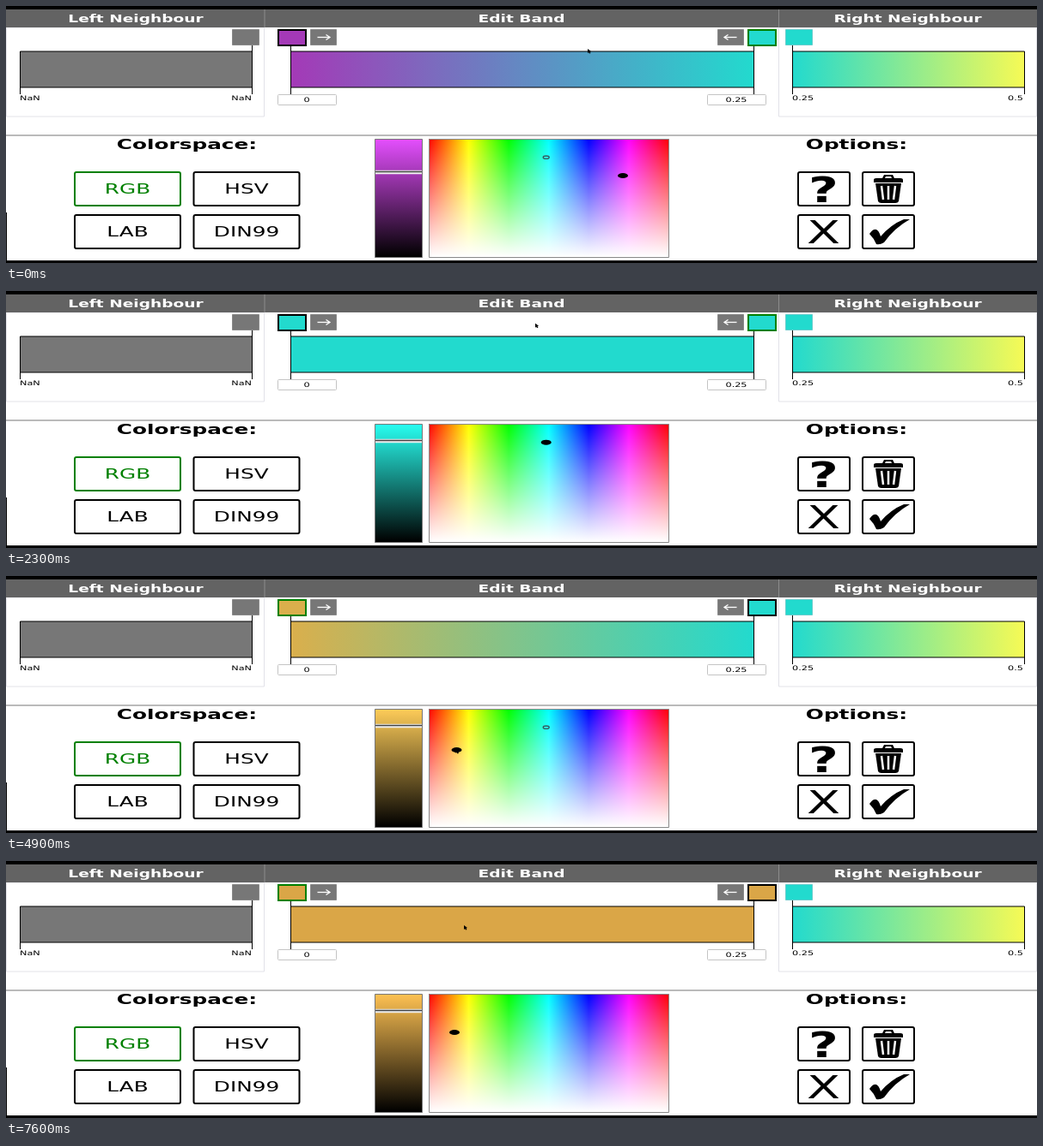
An HTML page with a canvas for the animation above (7700 ms loop, 1200x300 px).

```html
<!DOCTYPE html>
<html>
<head>
<meta charset="utf-8">
<style>
html, body { margin: 0; width: 100%; height: 100%; overflow: hidden; background: #fff; }
canvas { display: block; }
</style>
</head>
<body>
<canvas id="stage" width="1200" height="300"></canvas>
<script>
const ctx = document.getElementById('stage').getContext('2d');
const LOOP = 7700, STEP = 100, ASPECT = 1.5;
const FIELD = { x: 492, y: 155, w: 279.5, h: 138 };
const GREY = '#777', GREEN = '#008000';
const COPY_LEFT = 1600, SWITCH = 3300, PICK = 4800, PICK_END = 5000, COPY_RIGHT = 6200;

// time, x, y of the pointer
const pointerPath = [
  [0, 678, 51], [1000, 836, 36], [1700, 836, 36], [3000, 341, 42], [3500, 341, 42],
  [4200, 474, 141], [4800, 527, 206], [5000, 522, 200], [5200, 522, 200],
  [5700, 393, 55], [5900, 378, 37], [6900, 378, 37], [7200, 425, 44], [7600, 534, 76]
];

function pointerAt(t) {
  let i = 1;
  while (i < pointerPath.length - 1 && pointerPath[i][0] < t) i++;
  const [t0, x0, y0] = pointerPath[i - 1], [t1, x1, y1] = pointerPath[i];
  const k = Math.min(1, Math.max(0, (t - t0) / (t1 - t0)));
  const e = k * k * (3 - 2 * k);
  return { x: x0 + (x1 - x0) * e, y: y0 + (y1 - y0) * e };
}

function hsv(h, s, v) {
  const f = n => {
    const k = (n + h / 60) % 6;
    return Math.round(255 * v * (1 - s * Math.max(0, Math.min(k, 4 - k, 1))));
  };
  return `rgb(${f(5)},${f(3)},${f(1)})`;
}

const PURPLE = { x: 718, y: 198, v: 0.717 };
const TEAL = { x: 628.7, y: 176.7, v: 0.855 };
const colorOf = (p, v = p.v) =>
  hsv((p.x - FIELD.x) / FIELD.w * 360, 1 - (p.y - FIELD.y) / FIELD.h, v);

function box(x, y, w, h, fill, stroke, line = 1, radius = 0) {
  ctx.beginPath();
  ctx.roundRect(x, y, w, h, radius);
  if (fill) { ctx.fillStyle = fill; ctx.fill(); }
  if (stroke) { ctx.strokeStyle = stroke; ctx.lineWidth = line; ctx.stroke(); }
}

function line(x0, y0, x1, y1, color = '#000', width = 1) {
  ctx.strokeStyle = color;
  ctx.lineWidth = width;
  ctx.beginPath();
  ctx.moveTo(x0, y0);
  ctx.lineTo(x1, y1);
  ctx.stroke();
}

function gradient(x0, y0, x1, y1, ...colors) {
  const g = ctx.createLinearGradient(x0, y0, x1, y1);
  colors.forEach((c, i) => g.addColorStop(i / (colors.length - 1), c));
  return g;
}

// The whole stage has wide pixels, so all type shares one aspect.
function text(str, x, y, size, { bold = false, color = '#000', align = 'center' } = {}) {
  ctx.save();
  ctx.translate(x, y);
  ctx.scale(ASPECT, 1);
  ctx.font = `${bold ? 'bold ' : ''}${size}px "DejaVu Sans", sans-serif`;
  ctx.textAlign = align;
  ctx.fillStyle = color;
  ctx.fillText(str, 0, 0);
  ctx.restore();
}

function shape(path, color = '#000') {
  ctx.fillStyle = color;
  ctx.fill(new Path2D(path));
}

function band(x0, x1, fill, leftTop, rightTop) {
  box(x0 + .5, 53, x1 - x0, 42, fill, '#000');
  line(x0 + .5, leftTop, x0 + .5, 103);
  line(x1 + .5, rightTop, x1 + .5, 103);
}

function arrowButton(x, dir) {
  box(x + .5, 27.5, 30, 18, GREY, '#8a8a8a');
  const c = x + 15.5;
  line(c - 7, 36.5, c + 7, 36.5, '#fff', 1.3);
  ctx.beginPath();
  ctx.moveTo(c + dir * 3, 33.5);
  ctx.lineTo(c + dir * 7.5, 36.5);
  ctx.lineTo(c + dir * 3, 39.5);
  ctx.stroke();
}

function button(x, y, w, color = '#000') {
  box(x + 1, y + 1, w - 2, 39, '#fff', color, 2, 2);
}

function marker(p, rx, ry, filled) {
  ctx.beginPath();
  ctx.ellipse(p.x, p.y, rx, ry, 0, 0, 2 * Math.PI);
  if (filled) { ctx.fillStyle = '#000'; ctx.fill(); }
  else { ctx.strokeStyle = '#335c60'; ctx.lineWidth = 1.3; ctx.stroke(); }
}

function drawFrame() {
  box(0, 0, 1200, 300, '#fff');
  box(.5, 25, 300, 104, null, '#e2e2e8');
  box(899.5, 25, 300, 104, null, '#e2e2e8');
  box(0, 4, 1200, 21, '#636363');
  line(301, 4, 301, 25, '#8c8c8c');
  line(899.5, 4, 899.5, 25, '#8c8c8c');
  box(0, 0, 1200, 4, '#000');
  box(0, 297, 1200, 3, '#000');
  box(0, 241, 1, 59, '#000');
  line(0, 151, 1200, 151, '#777');
  const title = { bold: true, color: '#fff' };
  text('Left Neighbour', 151, 19, 12.4, title);
  text('Edit Band', 600, 19, 12.4, title);
  text('Right Neighbour', 1049.5, 19, 12.4, title);
}

function drawBands(left, right, leftActive) {
  const teal = colorOf(TEAL), a = colorOf(left), b = colorOf(right);
  band(16, 286, GREY, 53, 46);
  band(331, 870, gradient(331, 0, 871, 0, a, b), 47, 47);
  band(915, 1185, gradient(915, 0, 1185, 0, teal, '#f6fa55'), 46, 53);
  box(263.5, 27.5, 31, 18, GREY, '#8a8a8a');
  box(907.5, 27.5, 31, 18, teal, '#6cc');
  box(317, 28, 32, 18, a, leftActive ? GREEN : '#000', 2);
  box(864, 28, 32, 18, b, leftActive ? '#000' : GREEN, 2);
  arrowButton(354, 1);
  arrowButton(828, -1);

  text('NaN', 16, 110, 7.5, { align: 'left' });
  text('NaN', 286, 110, 7.5, { align: 'right' });
  text('0.25', 915, 110, 7.5, { align: 'left' });
  text('0.5', 1184, 110, 7.5, { align: 'right' });
  for (const [x, value] of [[316, '0'], [816, '0.25']]) {
    box(x + .5, 103.5, 68, 12, '#fff', '#c4c4c4', 1, 1);
    text(value, x + 34, 112, 7.5);
  }
}

function drawPicker(left, right) {
  const { x, y, w, h } = FIELD;
  box(429.5, y + .5, 55, h, gradient(0, y, 0, y + h, colorOf(left, 1), '#000'), '#777');
  const level = y + (1 - left.v) * h;
  line(430, level, 484, level, '#eee', 4.5);
  line(430, level - .5, 484, level - .5, '#444', 1.5);

  const hues = [0, 60, 120, 180, 240, 300, 360].map(a => hsv(a, 1, 1));
  box(x, y, w, h, gradient(x, 0, x + w, 0, ...hues));
  box(x, y, w, h, gradient(0, y, 0, y + h, 'rgba(255,255,255,0)', '#fff'));
  box(x + .5, y + .5, w - .5, h, null, '#888');
  marker(right, 3.5, 1.7, false);
  marker(left, 6, 3, true);
}

function drawButtons() {
  text('Colorspace:', 210.5, 167, 16.5, { bold: true });
  text('Options:', 990, 167, 16.5, { bold: true });
  ['RGB', 'HSV', 'LAB', 'DIN99'].forEach((name, i) => {
    const x = 79 + i % 2 * 138.5, y = i < 2 ? 193 : 243;
    const color = i ? '#000' : GREEN;
    button(x, y, 125, color);
    text(name, x + 62.5, y + 26, 16.5, { color });
  });
  for (const x of [921, 996]) for (const y of [193, 243]) button(x, y, 62, '#000');

  text('?', 951.5, 228.5, 40, { bold: true });
  text('X', 951.5, 277, 38);
  // trash can
  shape('M1010 206V203Q1010 201 1013 201H1020L1022 197H1032L1034 201H1041Q1044 201 1044 203V206Z');
  shape('M1023 201L1024 199H1030L1031 201Z', '#fff');
  shape('M1012 207H1042L1039 228Q1038 230 1035 230H1019Q1016 230 1015 228Z');
  line(1019, 210, 1021, 226, '#fff', 2.5);
  line(1027, 210, 1027, 226, '#fff', 2.5);
  line(1035, 210, 1033, 226, '#fff', 2.5);
  // check mark
  shape('M1005 266Q1009 260 1013 261Q1016 262 1018 269Q1030 255 1045 249H1052Q1034 259 1022 276Q1017 279 1013 278Q1010 271 1005 266Z');
}

function drawPointer({ x, y }) {
  const overButton = y < 48 && (x < 386 || x > 826);
  ctx.save();
  ctx.translate(x, y);
  if (overButton) shape('M-1 1L1 0L3 1.5L6 2L7 4L5 5H0L-2 3L1 2.5Z');
  else shape('M-1 -1L3 2L1.5 2.5L2.5 4L1 4.5L0.3 3L-1 4Z');
  ctx.restore();
}

function render(t) {
  const drag = { ...pointerAt(Math.min(t, PICK_END)), v: TEAL.v };
  const left = t < COPY_LEFT ? PURPLE : t < PICK ? TEAL : drag;
  const right = t < COPY_RIGHT ? TEAL : left;
  drawFrame();
  drawBands(left, right, t >= SWITCH);
  drawPicker(left, right);
  drawButtons();
  drawPointer(pointerAt(t));
}

const start = performance.now();
function tick() {
  const t = (performance.now() - start) % LOOP;
  render(Math.floor(t / STEP) * STEP);
  requestAnimationFrame(tick);
}
tick();
</script>
</body>
</html>
```
